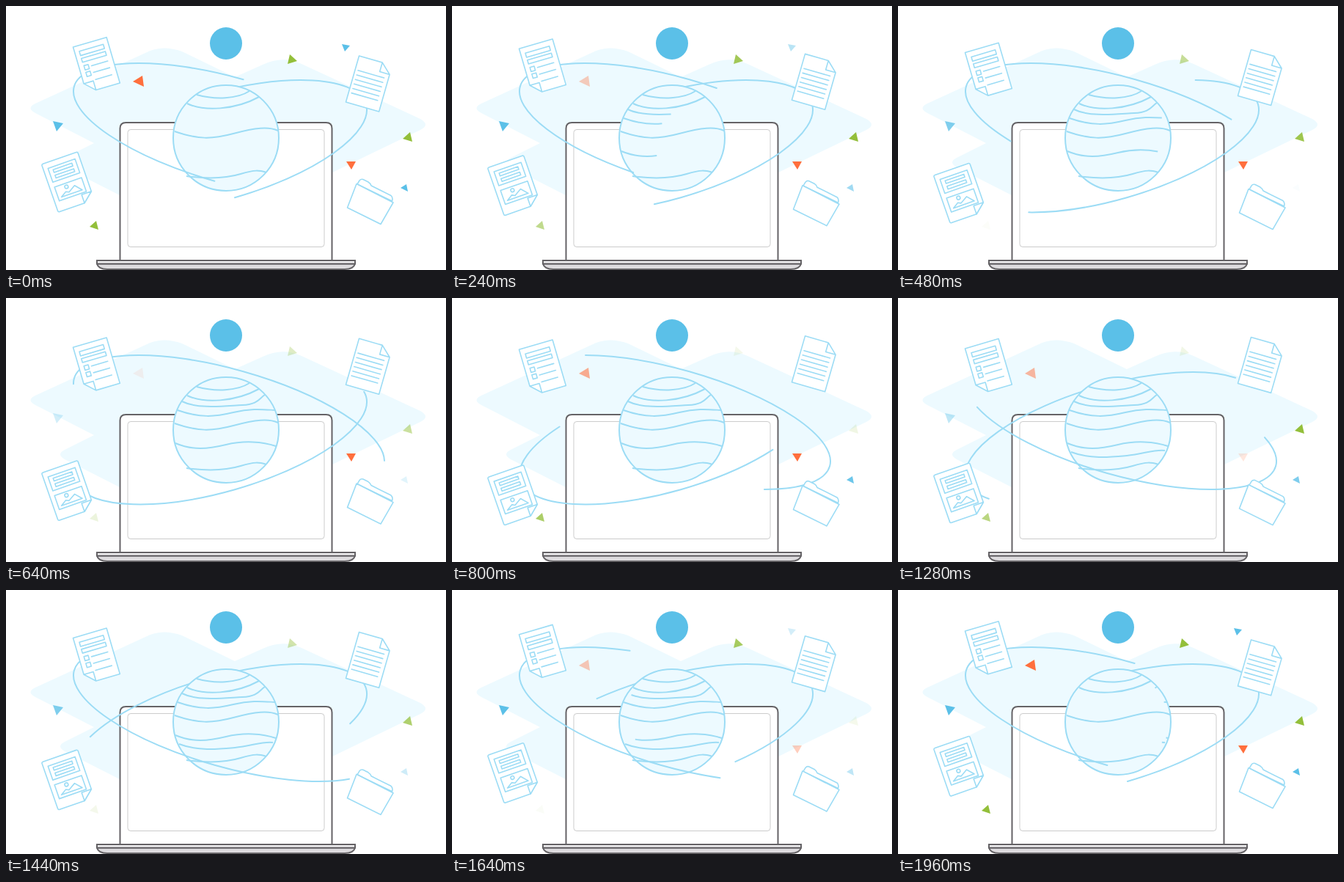
These frames come from a looping animation (600 by 360 pixels, 2000 ms). An HTML page:

```html
<!DOCTYPE html>
<html lang="en">
<head>
<meta charset="utf-8">
<title>Documents in orbit</title>
<style>
  html, body { margin: 0; width: 100%; height: 100%; overflow: hidden; background: #fff; }
  svg { display: block; width: 600px; height: 360px; }
  .line { fill: none; stroke: #9cdcf5; stroke-width: 2; }
  .paper { fill: #fff; stroke: #9cdcf5; stroke-width: 1.6; stroke-linejoin: round; stroke-linecap: round; }
  .orbit { stroke-dasharray: 2 2; stroke-linecap: round; }
  .laptop { fill: #fff; stroke: #656366; stroke-width: 2; }
</style>
</head>
<body>
<svg viewBox="0 0 600 360">
  <path fill="#edfaff" d="M120 187L40 146Q27 139 40 133L190 64Q212 52 240 62L312 97L350 80Q377 67 403 79L565 154Q579 162 565 169L445 227L400 250L155 258L80 220Q68 213 80 207Z"/>
  <circle cx="300" cy="51" r="22" fill="#5bc0e8"/>
  <g id="confetti"></g>

  <g class="laptop">
    <path d="M155.5 347V167Q155.5 159 163.5 159H436.500Q444.500 159 444.500 167V347"/>
    <rect x="166" y="168.500" width="268" height="160" rx="4" stroke="#ccc" style="stroke:#ccc;stroke-width:1"/>
    <path d="M124 351.500H476Q474 359 462 359H138Q126 359 124 351.500Z" style="fill:#dddbde"/>
    <path d="M124 347H476V351.500H124Z" style="fill:#f3f2f4"/>
  </g>

  <ellipse id="orbitA" class="line orbit" pathLength="4" rx="207" ry="72.800" transform="translate(292 191.200) rotate(-15.950)"/>
  <circle class="line" cx="300" cy="180" r="72" style="fill:#edfaff"/>
  <g id="waves" class="line"></g>
  <ellipse id="orbitB" class="line orbit" pathLength="4" rx="219.400" ry="72" transform="translate(304 169.500) rotate(15.800)"/>

  <g class="paper">
    <g data-rise="16">
      <g transform="translate(91.500 56) rotate(-16.300)">
        <path d="M0 0H47.500V65H13.500L0 52ZM0 52H13.500V65"/>
        <path d="M6.500 8h34v6h-34zM6.500 18h34v5.500h-34zM7 28.500h6v6h-6zM7 38h6v6h-6zM17 31.500H40M17 41H40M17 51H40"/>
      </g>
    </g>
    <g data-rise="32">
      <g transform="translate(48.500 216) rotate(-19.200)">
        <path d="M2 0H50Q52 0 52 2V57L38 69H2Q0 69 0 67V2Q0 0 2 0Z"/>
        <path d="M6.500 8h39v20h-39zM12.500 12h27v4h-27zM12.500 20h27v4h-27zM6.500 35h39v20h-39zM11 51L19 46L23 48L33 42L41 51Z"/>
        <circle cx="22" cy="40" r="2.400"/>
        <path d="M52 57H38V69Z"/>
      </g>
    </g>
    <g data-rise="-18">
      <g transform="translate(481.500 68) rotate(16)">
        <path d="M0 0H33L47 13V65.500H0ZM33 0V13H47"/>
        <path d="M4 19.500H41m-37 6.400H41m-37 6.400H41m-37 6.400H41m-37 6.400H41m-37 6.400H41"/>
      </g>
    </g>
    <g data-rise="15">
      <path d="M479 243L482 238Q484 235.500 487 236.500L494 240Q497 242 498 245L525 258.500Q528 261 526.500 266Z"/>
      <path d="M478 242.500L528 268L511 297.500L465.500 275Z"/>
    </g>
  </g>
</svg>

<script>
const LOOP = 2000;
const BLUE = '#5bc0e8', GREEN = '#93bf3a', ORANGE = '#ff6f3d';
const $ = id => document.getElementById(id);

function add(parent, tag, attrs) {
  const el = document.createElementNS('http://www.w3.org/2000/svg', tag);
  for (const k in attrs) el.setAttribute(k, attrs[k]);
  return parent.appendChild(el);
}

// Smooth 0..1 ramp between two times
function ease(t, from, to) {
  const u = Math.min(1, Math.max(0, (t - from) / (to - from)));
  return u * u * (3 - 2 * u);
}

// Eased value of a "time:value" key list
function track(keys, t) {
  let value = keys[0][1];
  for (let i = 1; i < keys.length; i++) {
    value += (keys[i][1] - keys[i - 1][1]) * ease(t, keys[i - 1][0], keys[i][0]);
  }
  return value;
}

// Colour, corners, opacity keys
const confetti = [
  [ORANGE, '173,103 186,95 188,110', '0:1 400:0 560:0 1000:1 1120:1 1440:0 1540:0 1780:1'],
  [BLUE, '64,157 78,160 69,171', '340:1 800:0 1030:0 1620:1'],
  [GREEN, '114,301 123,293 126,305', '0:1 540:0 541:0 920:1 1120:1 1520:0 1600:0 1920:1'],
  [BLUE, '458,52 469,54 462,62', '0:1 440:0 1520:0 1880:1'],
  [GREEN, '387,66 397,75 384,79', '0:1 1000:0 1120:0 1840:1'],
  [GREEN, '541,181 551,172 554,185', '380:1 860:.1 1100:1 1300:1 1720:0 1940:1'],
  [ORANGE, '464,212 477,212 471,223', '1000:1 1380:0 1500:0 1860:1'],
  [BLUE, '538,248 546,243 548,253', '0:1 540:0 560:0 860:1 1160:1 1520:.2 1900:1']
].map(([fill, points, keys]) => ({
  el: add($('confetti'), 'polygon', { fill, points }),
  keys: keys.split(' ').map(k => k.split(':').map(Number))
}));

// Path, then draw-on start and end, then wipe-off start
const waves = [
  ['M260 121C285 128 315 127 332 116'],
  ['M247 133C270 144 312 142 345 124'],
  ['M240 141C262 152 300 147 322 146S345 137 353 132', 0, 480, 1590],
  ['M234 153C265 164 285 162 310 156S350 152 367 153', 0, 560, 1640],
  ['M230 171C262 182 280 182 310 174S358 164 371 170'],
  ['M231 198C255 208 275 206 300 200S350 196 368 202', 0, 600, 1530],
  ['M236 210C262 220 290 217 312 215S350 206 364 208', 800, 1280, 1640],
  ['M246 232C275 236 300 235 320 229S345 224 355 227']
].map(([d, start, end, wipe]) => ({
  el: add($('waves'), 'path', { d, pathLength: 1 }), start, end, wipe
})).filter(w => w.end);

const papers = [...document.querySelectorAll('[data-rise]')];

function draw(t) {
  const turn = 4 * ease(t, 0, LOOP);
  $('orbitA').style.strokeDashoffset = -(3 + turn);
  $('orbitB').style.strokeDashoffset = -(1 + turn);

  const lift = ease(t, 0, LOOP / 2) - ease(t, LOOP / 2, LOOP);
  for (const p of papers) p.setAttribute('transform', `translate(0 ${p.dataset.rise * lift})`);

  for (const c of confetti) c.el.setAttribute('opacity', track(c.keys, t));

  for (const w of waves) {
    const head = ease(t, w.start, w.end), tail = ease(t, w.wipe, LOOP);
    w.el.setAttribute('visibility', head > tail ? 'visible' : 'hidden');
    w.el.setAttribute('stroke-dasharray', `0 ${tail} ${head - tail} 2`);
  }
}

const begin = performance.now();
function frame() {
  draw((performance.now() - begin) % LOOP);
  requestAnimationFrame(frame);
}
frame();
</script>
</body>
</html>
```
